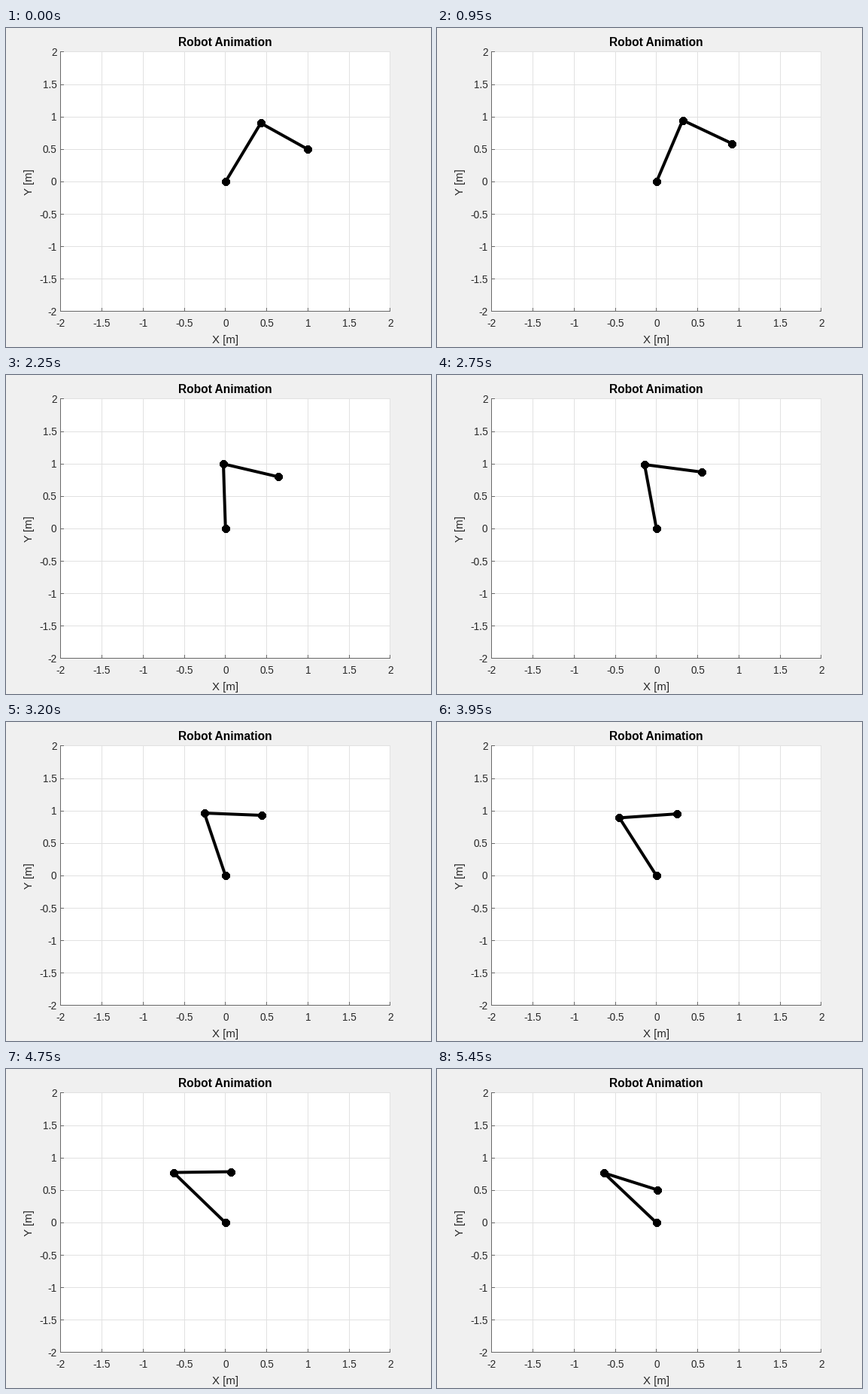
Write a matplotlib script that moves like this. It is 565 px wide and 424 px high and loops after 5500 ms.

```python
import numpy as np
import matplotlib.pyplot as plt
from matplotlib.animation import FuncAnimation
from matplotlib.patches import Rectangle

W, H, DPI = 565, 424, 72          # at 72 dpi one point is one pixel
FRAME_MS, HOLD, STEPS = 50, 10, 100
L1, L2 = 1.0, 0.7                 # link lengths in metres
ORIGIN = np.array([291.8, 204.4])
SCALE = np.array([109.5, -86.25])
INK, GRID, AXIS = "#262626", "#e1e1e1", "#686868"

plt.rcParams["font.family"] = "Liberation Sans"

# gripper path: step, x, y
PATH = np.array([
    (0, 1.000, 0.500), (12, 0.900, 0.605), (24, 0.772, 0.697),
    (36, 0.645, 0.800), (48, 0.524, 0.888), (60, 0.380, 0.952),
    (72, 0.222, 0.945), (86, 0.068, 0.787), (96, 0.022, 0.580),
    (100, 0.010, 0.508),
])
KNOTS, POINTS = PATH[:, 0], PATH[:, 1:]
SLOPES = np.gradient(POINTS, KNOTS, axis=0, edge_order=2)


def to_px(p):
    return ORIGIN + SCALE * np.asarray(p)


def gripper(k):
    """Cubic Hermite position along the path."""
    i = int(np.clip(np.searchsorted(KNOTS, k, side="right") - 1,
                    0, len(KNOTS) - 2))
    h = KNOTS[i + 1] - KNOTS[i]
    s = (k - KNOTS[i]) / h
    return ((1 + 2 * s) * (1 - s) ** 2 * POINTS[i]
            + s * (1 - s) ** 2 * h * SLOPES[i]
            + s * s * (3 - 2 * s) * POINTS[i + 1]
            + s * s * (s - 1) * h * SLOPES[i + 1])


def elbow(p):
    """Elbow-up inverse kinematics of the two links."""
    r = np.hypot(*p)
    bend = np.arccos((r * r + L1 ** 2 - L2 ** 2) / (2 * L1 * r))
    a = np.arctan2(p[1], p[0]) + bend
    return L1 * np.array([np.cos(a), np.sin(a)])


fig = plt.figure(figsize=(W / DPI, H / DPI), dpi=DPI, facecolor="#f0f0f0")
ax = fig.add_axes([0, 0, 1, 1])
ax.set_xlim(0, W)
ax.set_ylim(H, 0)
ax.axis("off")


def rule(x0, y0, x1, y1, color, z):
    ax.plot([x0, x1], [y0, y1], color=color, lw=1, zorder=z, snap=False,
            solid_capstyle="butt")


def label(x, y, s, size, ha="center", color=INK, **kw):
    ax.text(x, y, s, size=size, ha=ha, va="baseline", color=color, **kw)


left, top = np.floor(to_px((-2, 2)))
right, bottom = np.floor(to_px((2, -2))) + 1
ax.add_patch(Rectangle((left, top), right - left, bottom - top,
                       fc="white", ec="none", zorder=0))

for v in np.arange(-2, 2.1, 0.5):
    cx, cy = to_px((v, v))
    gx, gy = np.floor(cx) + 0.5, np.floor(cy) + 0.5
    rule(gx, top, gx, bottom, GRID, 1)
    rule(left, gy, right, gy, GRID, 1)
    rule(gx, bottom - 5, gx, bottom, AXIS, 2)
    rule(left, gy, left + 5, gy, AXIS, 2)
    label(cx, 397, f"{v:g}", 13.6)
    label(67.5, cy + 5, f"{v:g}", 13.6, ha="right")

rule(left, bottom - 0.5, right, bottom - 0.5, AXIS, 3)
rule(left + 0.5, top, left + 0.5, bottom, AXIS, 3)

label(291.8, 24, "Robot Animation", 15.5, color="black", weight="bold")
label(291.8, 419, "X [m]", 15)
label(35, 204.4, "Y [m]", 15, rotation=90, rotation_mode="anchor")

arm, = ax.plot([], [], color="black", lw=4, marker=(8, 2, 0), ms=10, mew=4,
               zorder=5)


def update(n):
    p = gripper(max(0, n - HOLD + 1))
    joints = to_px([(0, 0), elbow(p), p])
    arm.set_data(joints[:, 0], joints[:, 1])
    return arm,


anim = FuncAnimation(fig, update, frames=HOLD + STEPS, interval=FRAME_MS,
                     repeat=True, repeat_delay=0)
plt.show()
```
